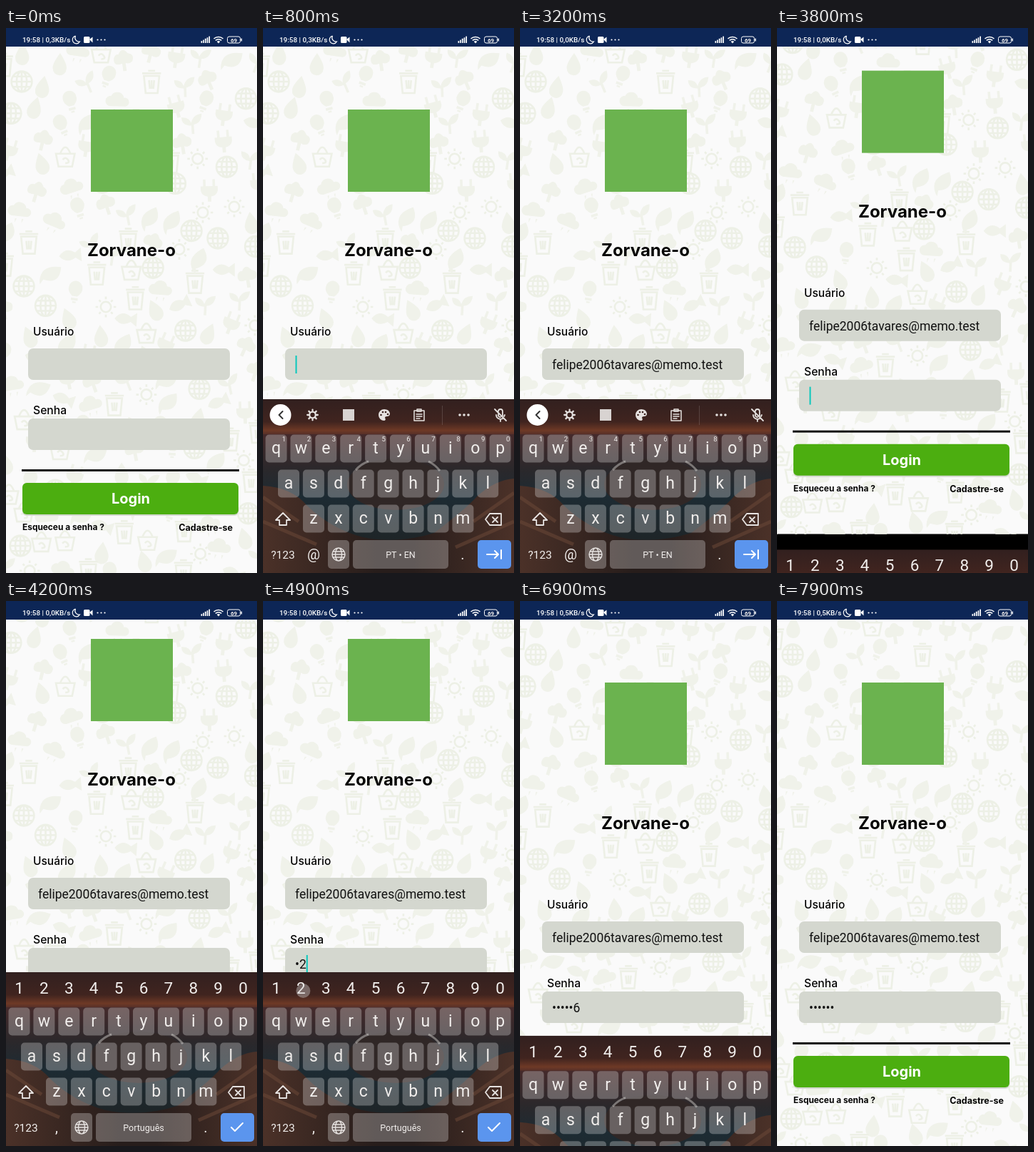
These frames come from a looping animation (352 by 762 pixels, 8 s). An HTML page:

```html
<!DOCTYPE html>
<html lang="pt">
<head>
<meta charset="utf-8">
<title>Login</title>
<style>
html, body { margin: 0; width: 100%; height: 100%; overflow: hidden; background: #000; }
svg { display: block; }
.ui { font-family: Inter, sans-serif; fill: #050505; }
.sys { font-family: Roboto, sans-serif; }
.mid { text-anchor: middle; }
.line { fill: none; stroke: #e6e2e0; stroke-width: 1.8; stroke-linecap: round; stroke-linejoin: round; }
</style>
</head>
<body>
<svg id="stage" width="352" height="762" viewBox="0 0 352 762"></svg>
<script>
const LOOP = 8000, KB_TOP = 519, KB_H = 243, PAN = 61;
const EMAIL = 'felipe2006tavares@memo.test', TYPED = 'felip';
const LETTER_TIMES = [1050, 1330, 1600, 1880, 2130];
const DIGIT_TIMES = [4480, 4850, 5230, 5600, 6000, 6400];
const PICK_TIME = 2700, FOCUS_1 = 400, FOCUS_2 = 3600;

const rect = (x, y, w, h, r, fill, extra = '') =>
  `<rect x="${x}" y="${y}" width="${w}" height="${h}" rx="${r}" fill="${fill}" ${extra}/>`;
const circle = (x, y, r, fill) => `<circle cx="${x}" cy="${y}" r="${r}" fill="${fill}"/>`;
const text = (x, y, size, str, cls, extra = '') =>
  `<text x="${x}" y="${y}" font-size="${size}" class="${cls}" ${extra}>${str}</text>`;
const icon = (x, y, d, extra = '') =>
  `<path class="line" transform="translate(${x} ${y})" d="${d}" ${extra}/>`;
const white = (x, y, size, str, extra = '') => text(x, y, size, str, 'sys mid', `fill="#f1eeec" ${extra}`);

// Faint wallpaper of nature icons; the first four are outlines, the rest solid.
const SHAPES = [
  'M-12 0a12 12 0 1 0 24 0a12 12 0 1 0-24 0ZM-12 0H12M0-12V12M-10-6H10M-10 6H10M0-12a6 12 0 0 0 0 24a6 12 0 0 0 0-24',
  'M-9-7H9L7 13H-7ZM-11-10H11M-4-13H4M-3-2L-2 8M3-2L2 8M0-2V8',
  'M-6 0a6 6 0 1 0 12 0a6 6 0 1 0-12 0M0-12V-9M0 9V12M-12 0H-9M9 0H12M-8-8L-6-6M8 8L6 6M8-8L6-6M-8 8L-6 6',
  'M-11-3H11L8 12H-8ZM-6-3Q0-18 6-3M-3 4Q0 0 3 4T0 8',
  'M-11 9Q-13-10 11-11Q13 10-7 7L-10 13Z',
  'M-10 7a6 6 0 0 1 1-12a8 8 0 0 1 15 2a5 5 0 0 1 2 10ZM-6 10l2 0-2 5ZM2 10l2 0-2 5Z',
  'M0-13Q9 0 8 5A8 8 0 0 1-8 5Q-9 0 0-13',
  'M-3 5Q-9 0-8-5A8 8 0 0 1 8-5Q9 0 3 5ZM-4 7H4V10H-4ZM-2 11H2V13H-2Z',
  'M-2 13V4Q-13 7-11-3Q-9-8-5-7Q0-16 6-7Q14-5 10 3Q6 6 2 4V13Z',
  'M-7-4V-12H-4V-4H4V-12H7V-4H10V1Q9 7 2 8V14H-2V8Q-9 7-10 1V-4Z',
  'M-13 0Q-5-11 6-3L13-8V8L6 3Q-5 10-13 0',
  'M-1 13V3Q-12 3-12-7Q-3-7-1 0Q2-10 12-10Q11 1 2 2V13Z'
];
const placed = [[1, 32, 300], [5, 70, 270], [2, 320, 250], [0, 297, 294], [0, 25, 361], [4, 62, 345],
  [7, 97, 369], [1, 265, 355], [1, 152, 526], [9, 285, 226], [10, 90, 318], [2, 140, 390],
  [8, 180, 590], [0, 22, 75], [5, 120, 525]];
let seed = 17;
const rand = () => (seed = seed * 16807 % 2147483647) / 2147483647;
for (let i = 0; i < 4000; i++) {
  const x = rand() * 360 - 4, y = 30 + rand() * 735;
  if (placed.every(p => Math.hypot(p[1] - x, p[2] - y) > 30))
    placed.push([Math.floor(rand() * SHAPES.length), x, y]);
}
const wallpaper = placed.map(([k, x, y], i) =>
  `<path d="${SHAPES[k]}" transform="translate(${x.toFixed(1)} ${y.toFixed(1)}) rotate(${k < 4 ? 0 : i * 47 % 50 - 25}) scale(1.2)"
  ${k < 4 ? 'fill="none" stroke="#edf0e6" stroke-width="2.2"' : 'fill="#f0f2ea"'}/>`).join('');

const app = `<g id="app" clip-path="url(#page)">
  ${rect(0, 0, 352, 762, 0, '#fafafa')}${wallpaper}
  ${rect(119, 114, 115, 115, 0, '#6bb34f')}
  ${text(176, 319, 24, 'Zorvane-o', 'ui mid', 'font-weight="700"')}
  ${text(38, 430, 15.5, 'Usuário', 'ui', 'font-weight="500"')}
  ${text(38, 540, 15.7, 'Senha', 'ui', 'font-weight="500"')}
  ${rect(31, 448, 283, 44, 7, '#d4d7cf')}${rect(31, 546, 283, 44, 7, '#d4d7cf')}
  ${text(45, 477, 17.5, '', 'sys', 'id="user" fill="#111"')}
  ${text(45, 575, 17.5, '', 'sys', 'id="pass" fill="#111"')}
  ${rect(0, 0, 2, 25, 0, '#08c8bc', 'id="caret"')}
  ${rect(22, 617, 305, 3, 0, '#111')}
  ${rect(23, 638, 303, 44, 6, '#d3d8cf')}${rect(23, 636, 303, 44, 6, '#4cae10')}
  ${text(175, 665, 20, 'Login', 'ui mid', 'font-weight="700" style="fill:#fff"')}
  ${text(23, 702, 11.9, 'Esqueceu a senha ?', 'ui', 'font-weight="700"')}
  ${text(318, 703, 12.5, 'Cadastre-se', 'ui', 'font-weight="700" text-anchor="end"')}
</g>`;

const STEP = 34.9;
const keyRow = (letters, x0, y) => [...letters].map((c, i) => {
  const x = x0 + i * STEP;
  return rect(x - 15, y - 19.5, 30, 39, 5, '#fff', 'fill-opacity=".27"') + white(x, y + 7, 23, c);
}).join('');
const digitRow = (y, size, dx) => [...'1234567890'].map((c, i) => white(18.5 + dx + i * STEP, y, size, c)).join('');
const divider = x => rect(x, 528, 1, 27, 0, '#fff', 'fill-opacity=".15"');
const arrow = d => circle(24.5, 541, 15, '#fff') + icon(24.5, 541, d, 'style="stroke:#333;stroke-width:2"');
const suggestion = (x, name) =>
  white(x, 533, 12, name, 'font-weight="500"') + white(x, 549, 12, '@memo.test', 'font-weight="500"');
const micOff = icon(333, 541, 'M-3-5a3 3 0 0 1 6 0V1M-3-1a3 3 0 0 0 3 4M-6 0a6 6 0 0 0 9 5M6 0L5 2M0 6V9M-8-8L8 8');
const teeth = Array.from({ length: 8 }, (_, i) => {
  const a = i * Math.PI / 4, c = Math.cos(a), s = Math.sin(a);
  return `M${c * 5.5} ${s * 5.5}L${c * 7.3} ${s * 7.3}`;
}).join('');

const keyboard = `<g id="kb">
  <g clip-path="url(#kbClip)">
    ${rect(0, KB_TOP, 352, KB_H, 0, 'url(#sky)')}
    ${rect(0, 568, 352, 194, 0, 'url(#valley)')}
    <ellipse cx="186" cy="638" rx="68" ry="36" fill="#302726"/>
    <path d="M0 640Q40 642 62 668Q95 700 140 712Q190 722 240 706Q285 672 300 655Q325 632 352 630V762H0Z" fill="url(#rock)"/>
    <path d="M0 656L50 690M0 690L75 722M352 650L295 690M352 690L270 726" stroke="#6b4838" stroke-opacity=".55" stroke-width="5"/>
    <path d="M130 618q8-9 18-12M232 606q10 5 16 13" fill="none" stroke="#c9c5c1" stroke-opacity=".5" stroke-width="3"/>
  </g>
  <g id="tools">${arrow('M3-5L-2 0L3 5')}
    ${icon(69.5, 541, 'M-4.3 0a4.3 4.3 0 1 0 8.6 0a4.3 4.3 0 1 0-8.6 0' + teeth, 'style="stroke-width:2.3"')}
    ${rect(112, 533, 16, 16, 0, '#d8d3d1')}
    <path d="M170 533a8 8 0 1 0 0 16q3-1 1-4q0-2 3-2q4 0 4-4q-1-6-8-6" fill="#e6e2e0"/>
    ${[[165.5, 541], [168, 537], [172, 537], [175, 540]].map(p => circle(...p, 1.3, '#3d2521')).join('')}
    ${icon(219, 541, 'M-7-6H7V8H-7ZM-3-8H3V-5H-3ZM-4-1H4M-4 2H4M-4 5H1', 'style="stroke-width:1.5"')}
    ${divider(251)}${[276, 282, 288].map(x => circle(x, 541, 1.8, '#e6e2e0')).join('')}${micOff}
  </g>
  <g id="hints">${arrow('M-2-5L3 0L-2 5')}${white(80, 547, 18, '', 'id="word"')}
    ${divider(126)}${suggestion(172, 'felipe2...avares')}${divider(222)}${suggestion(268, 'felipet...res.pt')}${micOff}
  </g>
  <g id="digits">${digitRow(549, 22.5, 0)}</g>
  ${keyRow('qwertyuiop', 18.5, 588)}${keyRow('asdfghjkl', 36, 637)}${keyRow('zxcvbnm', 71, 686)}
  ${icon(28, 687, 'M0-9L10 1H5V8H-5V1H-10Z')}
  ${icon(323, 687, 'M-11 0L-5-8H11V8H-5ZM-1-3L6 4M6-3L-1 4')}
  ${white(28, 742, 15.5, '?123')}
  ${rect(91, 716, 30, 40, 5, '#fff', 'fill-opacity=".27"')}
  ${icon(106, 736, 'M-9 0a9 9 0 1 0 18 0a9 9 0 1 0-18 0M-9 0H9M-8-4H8M-8 4H8M0-9a4.5 9 0 0 0 0 18a4.5 9 0 0 0 0-18', 'style="stroke-width:1.4"')}
  ${rect(126, 716, 134, 40, 5, '#fff', 'fill-opacity=".27"')}
  ${white(280, 743, 20, '.')}${rect(301, 716, 47, 40, 5, '#5b95ee')}
  <g id="textKeys">${digitRow(578, 9.5, 11)}${white(71, 743, 20, '@')}${white(193, 741, 12.5, 'PT • EN')}
    ${icon(324, 736, 'M-10 0H6M1-5L6 0L1 5M10-6V6', 'style="stroke:#fff;stroke-width:2"')}</g>
  <g id="passKeys">${white(71, 743, 20, ',')}${white(193, 741, 12.5, 'Português')}
    ${icon(324, 736, 'M-8 0L-3 5L8-6', 'style="stroke:#fff;stroke-width:2"')}</g>
  <circle id="touch" r="10" fill="#ddd" fill-opacity=".38"/>
</g>`;

const status = `<g>${rect(0, 0, 352, 26, 0, '#0d2656')}
  ${text(23, 20, 9.9, '', 'sys', 'id="net" fill="#fff" font-weight="500"')}
  <path d="M97.5 11a5.5 5.5 0 1 0 6 8a5.5 5.5 0 0 1-6-8" fill="none" stroke="#fff" stroke-width="1.2"/>
  ${rect(109, 12, 8.5, 9, 1.5, '#fff')}<path d="M117 16l4.5-3.5v8z" fill="#fff"/>
  ${[128.5, 133.5, 138.5].map(x => circle(x, 16.5, 1.1, '#fff')).join('')}
  ${[0, 1, 2, 3, 4].map(i => rect(273.5 + i * 2.7, 18 - i * 1.6, 1.7, 3 + i * 1.6, .5, '#fff')).join('')}
  <path d="M291.5 15a9.5 9.5 0 0 1 13 0M293.8 17.4a6 6 0 0 1 8.4 0" fill="none" stroke="#fff" stroke-width="1.5"/>
  <path d="M295.7 19a3.5 3.5 0 0 1 4.6 0L298 21.6z" fill="#fff"/>
  <rect x="310.5" y="12" width="18" height="9" rx="2.5" fill="none" stroke="#fff"/>${rect(329.5, 14.5, 1.5, 4, .5, '#fff')}
  ${white(319.5, 19.5, 8, '69', 'font-weight="700"')}</g>`;

document.getElementById('stage').innerHTML = `<defs>
  <clipPath id="page"><rect width="352" height="762"/></clipPath>
  <clipPath id="kbClip"><rect y="${KB_TOP}" width="352" height="${KB_H}"/></clipPath>
  <linearGradient id="sky" x2="0" y2="1">
    <stop stop-color="#32201f"/><stop offset=".13" stop-color="#40241f"/>
    <stop offset=".18" stop-color="#6e3926"/><stop offset=".22" stop-color="#44292a"/>
  </linearGradient>
  <linearGradient id="valley" x2="0" y2="1">
    <stop stop-color="#452a2b"/><stop offset=".25" stop-color="#2b282b"/><stop offset=".45" stop-color="#1d2b33"/>
    <stop offset=".75" stop-color="#1e2528"/>
  </linearGradient>
  <linearGradient id="rock">
    <stop stop-color="#4b3128"/><stop offset=".45" stop-color="#271d1b"/>
    <stop offset=".6" stop-color="#271d1b"/><stop offset="1" stop-color="#4b3128"/>
  </linearGradient></defs>${rect(0, 0, 352, 762, 0, '#000')}${app}${keyboard}${status}`;

const $ = id => document.getElementById(id);
const show = (id, on) => $(id).setAttribute('visibility', on ? 'visible' : 'hidden');
const shift = (id, y) => $(id).setAttribute('transform', `translate(0 ${y.toFixed(2)})`);
const phase = (t, start, dur) => Math.min(1, Math.max(0, (t - start) / dur));
const easeIn = p => p * p, easeOut = p => 1 - (1 - p) ** 2;

function keyboardDrop(t) {
  if (t < 2900) return KB_H * (1 - easeOut(phase(t, 420, 300)));
  if (t < FOCUS_2) return KB_H * easeIn(phase(t, 3300, 250));
  if (t < 6000) return KB_H * (1 - easeOut(phase(t, 3780, 300)));
  return KB_H * easeIn(phase(t, 6750, 250));
}

function keyCenter(c) {
  for (const [row, x, y] of [['1234567890', 18.5, 543], ['qwertyuiop', 18.5, 588], ['asdfghjkl', 36, 637]])
    if (row.includes(c)) return [x + row.indexOf(c) * STEP + 3, y + 2];
  return [176, 737];
}

function draw() {
  const t = performance.now() % LOOP;
  const secret = t >= FOCUS_2, picked = t >= PICK_TIME;
  const letters = LETTER_TIMES.filter(s => s <= t).length;
  const digits = DIGIT_TIMES.filter(s => s <= t).length;
  const composing = !picked && letters > 0;

  shift('app', -PAN * (easeOut(phase(t, FOCUS_2, 300)) - easeOut(phase(t, 6600, 250))));
  shift('kb', keyboardDrop(t));

  const user = $('user'), pass = $('pass');
  user.textContent = picked ? EMAIL : TYPED.slice(0, letters);
  user.setAttribute('text-decoration', composing ? 'underline' : 'none');
  const masked = digits && t - DIGIT_TIMES[digits - 1] >= 1450;
  pass.textContent = digits ? '•'.repeat(digits - 1) + (masked ? '•' : digits) : '';

  const edits = [FOCUS_1, ...LETTER_TIMES, PICK_TIME, FOCUS_2, ...DIGIT_TIMES].filter(s => s <= t);
  const lastEdit = edits[edits.length - 1];
  show('caret', edits.length && (t - lastEdit) % 1000 < 500);
  const field = secret ? pass : user;
  $('caret').setAttribute('x', 45 + (field.textContent ? field.getComputedTextLength() : .5));
  $('caret').setAttribute('y', secret ? 556 : 458);

  show('tools', !secret && !composing);
  show('hints', !secret && composing);
  show('digits', secret);
  show('textKeys', !secret);
  show('passKeys', secret);
  $('word').textContent = TYPED.slice(0, letters);

  const presses = secret ? DIGIT_TIMES : LETTER_TIMES;
  const hit = presses.findIndex(s => Math.abs(t - s) < (secret ? 80 : 60));
  show('touch', hit >= 0);
  if (hit >= 0) {
    const [x, y] = keyCenter(secret ? String(hit + 1) : TYPED[hit]);
    $('touch').setAttribute('cx', x);
    $('touch').setAttribute('cy', y);
  }
  $('net').textContent = `19:58 | ${t < 1500 ? '0,3' : t < 5400 ? '0,0' : '0,5'}KB/s`;
  requestAnimationFrame(draw);
}
draw();
</script>
</body>
</html>
```
